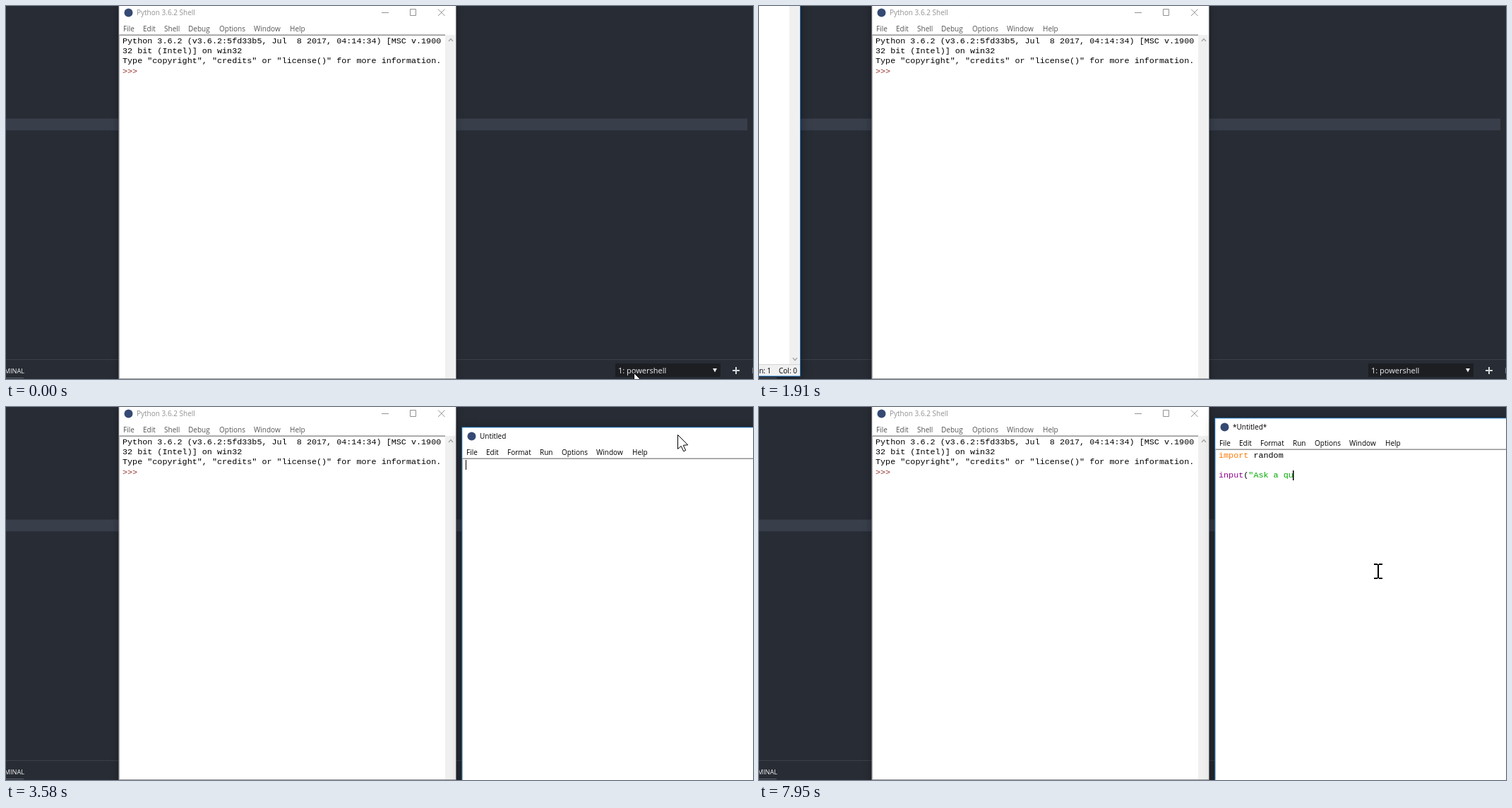
An HTML page with a canvas that plays this animation: 1058x529 px, repeating every 8000 ms.

```html
<!DOCTYPE html>
<html lang="en">
<head>
<meta charset="utf-8">
<title>Editor session</title>
<style>
  html, body { margin: 0; width: 100%; height: 100%; overflow: hidden; background: #282c34; }
  canvas { display: block; }
</style>
</head>
<body>
<canvas id="stage" width="1058" height="529"></canvas>
<script>
const ctx = document.getElementById('stage').getContext('2d');
const LOOP = 8000;
const UI = '"Open Sans", "Noto Sans", sans-serif';
const MONO = '11.76px "Liberation Mono", monospace';
const CHAR = 7.055, LINE = 14.1;
const BLUE = '#1883d7';

const SHELL = {
  x: 159, y: -4, w: 479, h: 640, title: 'Python 3.6.2 Shell',
  menu: [['File', 7], ['Edit', 35], ['Shell', 65], ['Debug', 99], ['Options', 143], ['Window', 192], ['Help', 243]]
};
const EDITOR = {
  w: 591, h: 629,
  menu: [['File', 7], ['Edit', 35], ['Format', 65], ['Run', 111], ['Options', 142], ['Window', 191], ['Help', 242]]
};
const BANNER = [
  'Python 3.6.2 (v3.6.2:5fd33b5, Jul  8 2017, 04:14:34) [MSC v.1900',
  '32 bit (Intel)] on win32',
  'Type "copyright", "credits" or "license()" for more information.'
];
// label, shortcut, row centre
const FILE_MENU = [
  ['New File', 'Ctrl+N', 51], ['Open...', 'Ctrl+O', 68], ['Open Module...', 'Alt+M', 84.5],
  ['Recent Files', '', 101], ['Class Browser', 'Alt+C', 118], ['Path Browser', '', 135],
  ['Save', 'Ctrl+S', 159.5], ['Save As...', 'Ctrl+Shift+S', 176], ['Save Copy As...', 'Alt+Shift+S', 193],
  ['Print Window', 'Ctrl+P', 217.5], ['Close', 'Alt+F4', 242], ['Exit', 'Ctrl+Q', 259]
];
// time, first line, third line, caret line (-1 when hidden)
const TYPING = [
  [0, '', '', 0], [4040, '', '', -1], [4320, '', '', 0],
  [4600, 'im', '', 0], [4680, 'imp', '', 0], [4880, 'impo', '', 0], [4970, 'impor', '', 0],
  [5170, 'import', '', -1], [5260, 'import ', '', 0], [5350, 'import r', '', 0],
  [5440, 'import ra', '', 0], [5530, 'import ran', '', 0], [5630, 'import rand', '', 0],
  [5720, 'import rando', '', 0], [5810, 'import random', '', -1], [6090, 'import random', '', 2],
  [6270, 'import random', 'i', 2], [6370, 'import random', 'in', 2], [6460, 'import random', 'inp', 2],
  [6560, 'import random', 'input', 2], [6740, 'import random', 'input(', -1],
  [6920, 'import random', 'input("', -1], [7010, 'import random', 'input("', 2],
  [7110, 'import random', 'input("A', 2], [7200, 'import random', 'input("As', 2],
  [7380, 'import random', 'input("Ask ', 2], [7580, 'import random', 'input("Ask a', -1],
  [7770, 'import random', 'input("Ask a q', -1], [7950, 'import random', 'input("Ask a qu', 2]
];

const lerp = (a, b, k) => a + (b - a) * k;
const smooth = k => k * k * (3 - 2 * k);
// index of the current step when `count` steps run from `start` to `end`
const stepAt = (t, start, end, count) =>
  Math.max(0, Math.min(count - 1, Math.floor((t - start) / (end - start) * (count - 1) + 0.01)));

function rect(color, x, y, w, h) {
  ctx.fillStyle = color;
  ctx.fillRect(x, y, w, h);
}

function text(str, x, y, color, font, align = 'left') {
  ctx.font = font;
  ctx.fillStyle = color;
  ctx.textAlign = align;
  ctx.fillText(str, x, y);
}

const label = (str, x, y, color, size = 10) => text(str, x, y, color, `${size}px ${UI}`);

function path(points, color, width, close) {
  ctx.beginPath();
  points.forEach(([x, y]) => ctx.lineTo(x, y));
  if (close) ctx.closePath();
  ctx.strokeStyle = color;
  ctx.lineWidth = width;
  ctx.stroke();
}

function polygon(color, ...points) {
  ctx.fillStyle = color;
  ctx.beginPath();
  points.forEach(([x, y]) => ctx.lineTo(x, y));
  ctx.fill();
}

function drawDesktop() {
  rect('#282c34', 0, 0, 1058, 529);
  rect('#383e4a', 0, 159.6, 1050, 16.8);
  rect('#3b404a', 0, 501, 1058, 1);
  text('TERMINAL', 26, 521, '#f0f1f3', `9.2px ${UI}`, 'right');
  rect('#5b616c', 0, 527, 25, 1);
  rect('#1c1e22', 863, 507, 149, 19);
  label('1: powershell', 867, 521, '#f0f0f0', 11);
  polygon('#f0f0f0', [1001, 514], [1007, 514], [1004, 519.5]);
  rect('#d5d7da', 1029, 516, 10, 2);
  rect('#d5d7da', 1033, 512, 2, 10);
  rect('#777c85', 1057, 513, 1, 8);
}

function drawButtons(right, y, color) {
  rect(color, right - 106, y + 13, 10, 1);
  path([[right - 65.5, y + 8.5], [right - 57.5, y + 8.5], [right - 57.5, y + 17.5], [right - 65.5, y + 17.5]], color, 1, true);
  path([[right - 26, y + 8.5], [right - 16.5, y + 18]], color, 1);
  path([[right - 16.5, y + 8.5], [right - 26, y + 18]], color, 1);
}

// The scaled-down window edges fall between whole pixels.
function drawFrame(x, y, w, h, active) {
  const left = x + 0.4, top = y + 0.4, width = w - 0.6;
  ctx.save();
  ctx.shadowColor = active ? 'rgba(0,0,0,.36)' : 'rgba(0,0,0,.3)';
  ctx.shadowBlur = active ? 14 : 10;
  ctx.shadowOffsetY = 3;
  rect(active ? BLUE : '#8b8e93', left, top, width, h);
  ctx.restore();
  rect('#fff', left + 0.9, top + 0.9, width - 1.8, h - 1.8);
  rect('#f0f0f0', x + w - 16, y + 45, 14.9, h - 46);
  rect('#8a8a8a', left + 0.9, y + 44.5, w - 17.3, 1.4);
  rect('#a8a8a8', left + 0.9, y + 45.5, 0.8, h - 63);
  rect('#f0f0f0', left + 0.9, y + h - 17, width - 1.8, 16);
  rect('#d4d4d4', left + 0.9, y + h - 17, width - 1.8, 1);
}

function drawWindow({ x, y, w, h, title, menu }, active, menuOpen) {
  const right = x + w, bottom = y + h;
  drawFrame(x, y, w, h, active);

  ctx.fillStyle = '#354a73';
  ctx.beginPath();
  ctx.arc(x + 14.5, y + 13.5, 6, 0, Math.PI * 2);
  ctx.fill();
  label(title, x + 26, y + 17, active ? '#000' : '#929292');
  drawButtons(right, y, active ? '#000' : '#929292');

  if (menuOpen) {
    rect('#99d1ff', x + 1, y + 28, 28, 16);
    rect('#cce8ff', x + 2, y + 29, 26, 14);
  }
  for (const [name, dx] of menu) label(name, x + dx, y + 39.5, active ? '#000' : '#555');

  path([[right - 11, y + 54], [right - 8, y + 50.5], [right - 5, y + 54]], '#a3a3a3', 1.3);
  path([[right - 11, bottom - 26], [right - 8, bottom - 22.5], [right - 5, bottom - 26]], '#a3a3a3', 1.3);
  label('Ln: 1', right - 64, bottom - 4, '#000');
  label('Col: 0', right - 31, bottom - 4, '#000');
}

function drawShell(active, menuOpen) {
  drawWindow(SHELL, active, menuOpen);
  BANNER.forEach((line, i) => text(line, 165, 53 + i * LINE, '#000', MONO));
  text('>>>', 165, 53.5 + 3 * LINE, '#96302a', MONO);
  if (active) rect('#000', 192, 85, 2, 14);
  rect('#9a9a9a', 160, 528, 477, 1);
}

// runs: [string, color] drawn one after another
function drawCode(runs, x, y) {
  let column = 0;
  for (const [str, color] of runs) {
    text(str, x + column * CHAR, y, color, MONO);
    column += str.length;
  }
}

function drawEditor(t, x, y) {
  const [, first, third, caret] = TYPING.filter(entry => entry[0] <= t).pop();
  drawWindow({ ...EDITOR, x, y, title: t < 4600 ? 'Untitled' : '*Untitled*' }, true);
  const left = x + 6, base = y + 57;
  drawCode([[first.slice(0, 6), first.length < 6 ? '#000' : '#ff7700'], [first.slice(6), '#000']], left, base);
  drawCode([
    [third.slice(0, 5), third.length < 5 ? '#000' : '#900090'],
    [third.slice(5, 6), '#000'],
    [third.slice(6), '#00aa00']
  ], left, base + 2 * LINE);
  if (caret >= 0) {
    const length = (caret ? third : first).length;
    const offset = length ? Math.round(length * CHAR) - 1 : 0;
    rect('#000', left + offset, y + 47 + caret * 14, length ? 1.5 : 1, 14);
  }
}

function drawFileMenu() {
  ctx.save();
  ctx.shadowColor = 'rgba(0,0,0,.55)';
  ctx.shadowBlur = 4;
  ctx.shadowOffsetX = ctx.shadowOffsetY = 2;
  rect('#b4b4b4', 10, 40, 178, 230);
  ctx.restore();
  rect('#f0f0f0', 11, 41, 176, 228);
  rect('#0078d7', 12, 42, 173, 17);
  for (const y of [146, 204, 229]) rect('#989898', 13, y, 171, 1);
  FILE_MENU.forEach(([name, keys, y], i) => {
    const color = i ? '#000' : '#fff';
    label(name, 31, y + 3.7, color);
    label(keys, 112, y + 3.7, color, 10.5);
  });
  polygon('#000', [175, 97], [175, 104], [179.5, 100.5]);
}

function drawArrow(x, y) {
  const shape = [[0, 0], [0, 20], [4.7, 16], [8.2, 23.3], [11.2, 22], [7.8, 14.8], [14.2, 14.3]]
    .map(([dx, dy]) => [x + dx + 0.5, y + dy + 0.5]);
  polygon('#fff', ...shape);
  path(shape, '#000', 1, true);
}

function drawBeam(x, y) {
  rect('#000', x - 1, y - 10, 2, 20);
  for (const edge of [y - 11, y + 9]) {
    rect('#000', x - 6, edge, 5, 2);
    rect('#000', x + 1, edge, 5, 2);
  }
}

function dragPose(t) {
  const n = stepAt(t, 2920, 3660, 9);
  const rest = (1 - Math.min(1, n / 7)) ** 2;
  const x = Math.round(951 - 266 * rest);
  const y = t >= 3760 ? 26 : n === 8 ? 30 : Math.round(39 + 57 * rest);
  return { cursor: [x, y], win: n ? [x - 306, y - 11] : [202, 62] };
}

function cursorAt(t) {
  if (t < 80) return [889, 520];
  if (t < 700) {
    const k = smooth((stepAt(t, 80, 620, 7) + 1) / 7);
    return [lerp(889, 176, k), lerp(520, 34, k)];
  }
  if (t < 960) {
    const k = stepAt(t, 700, 880, 3) / 2;
    return [lerp(174, 156, k), lerp(36, 47, k)];
  }
  if (t < 1060) return [150, 50];
  if (t < 1340) return [142, 55];
  if (t < 1910) {
    const k = stepAt(t, 1340, 1910, 7) / 6;
    return [lerp(142, -30, k), lerp(55, 12, k)];
  }
  if (t < 2920) return null;
  if (t < 3760) return dragPose(t).cursor;
  const k = stepAt(t, 3760, 4040, 4) / 3;
  return [lerp(951, 877, k), lerp(26, 233, k)];
}

function draw(t) {
  const menuOpen = t >= 700 && t < 1340;
  drawDesktop();
  drawShell(t >= 620 && t < 1430, menuOpen);
  if (t >= 1430) {
    const [x, y] = t < 2920 ? [-532, -104] : dragPose(t).win;
    ctx.globalAlpha = t < 1530 ? 0.5 : 1;
    drawEditor(t, x, y);
    ctx.globalAlpha = 1;
  }
  if (menuOpen) drawFileMenu();
  const cursor = cursorAt(t);
  if (cursor) {
    const overText = t >= 3760 && cursor[1] > 60;
    (overText ? drawBeam : drawArrow)(...cursor.map(Math.round));
  }
}

const started = performance.now();
function tick() {
  draw((performance.now() - started) % LOOP);
  requestAnimationFrame(tick);
}
tick();
</script>
</body>
</html>
```
